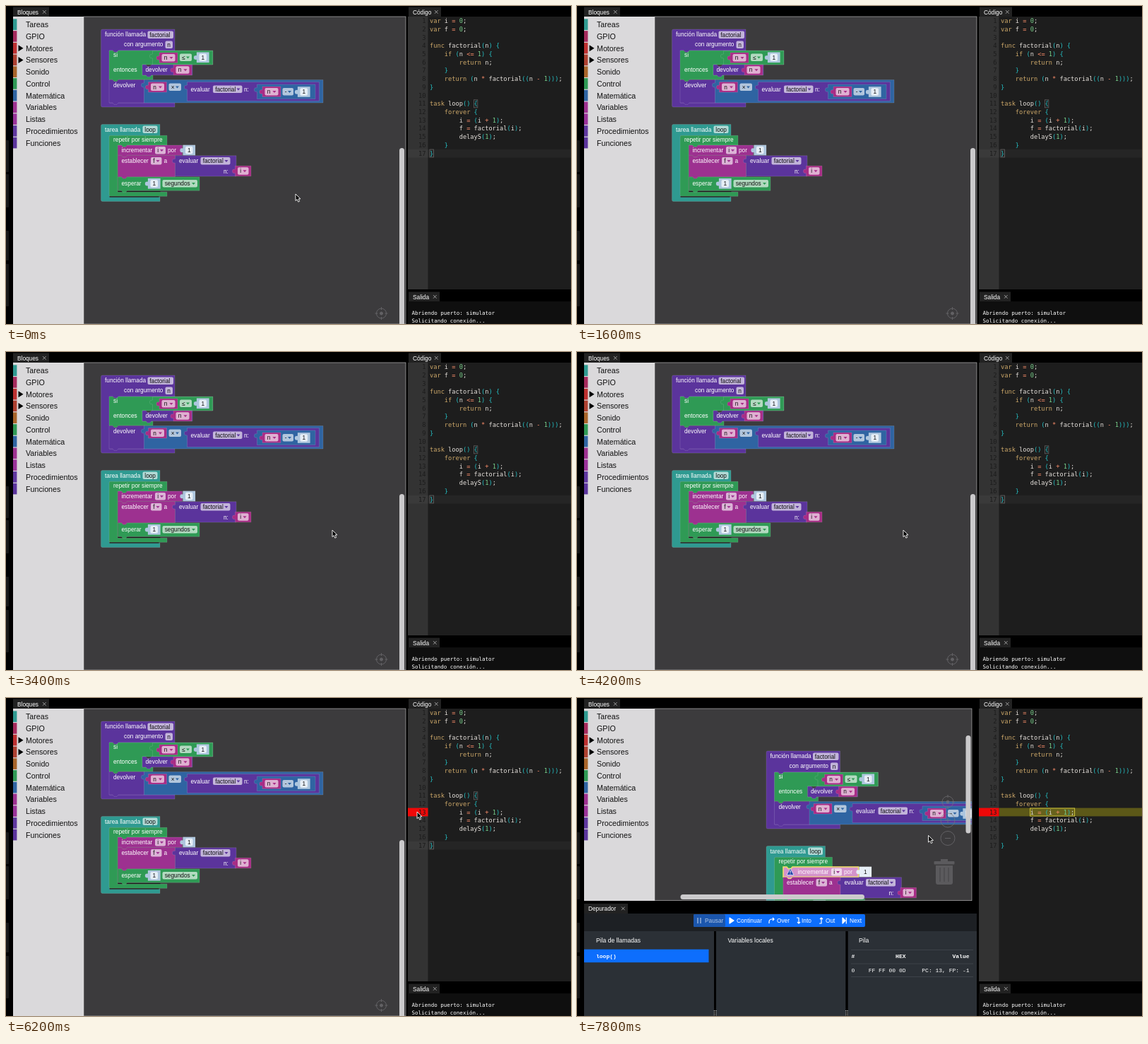
Recreate the animation shown at these times as an HTML page. Size 800 px wide and 450 px high, loop 8000 ms.

```html
<!DOCTYPE html>
<html lang="es">
<head>
<meta charset="utf-8">
<title>Depurador de bloques</title>
<style>
html, body { margin: 0; width: 100%; height: 100%; overflow: hidden; background: #000; }
svg { display: block; width: 100vw; height: 100vh; }
text { font-family: "Liberation Sans", Arial, sans-serif; font-size: 8.3px; fill: #fff; white-space: pre; }
.cat { font-size: 10.7px; fill: #111; }
.code { font-family: "DejaVu Sans Mono", monospace; font-size: 8.67px; fill: #e6e1dc; }
.out { font-family: "DejaVu Sans Mono", monospace; font-size: 7.52px; }
.mono { font-family: "Liberation Mono", monospace; font-size: 8px; }
.b { font-weight: bold; }
.dark { fill: #111; }
.end { text-anchor: end; }
.mid { text-anchor: middle; }
</style>
</head>
<body>
<svg id="stage" viewBox="0 0 800 450" preserveAspectRatio="none"></svg>
<script>
const LOOP = 8000, STEP = 200, BREAK_AT = 5800, HIT_AT = 6400;
const C = {
  teal: '#2f9a91', green: '#2f9a55', purple: '#5b349c', blue: '#2f64a2',
  magenta: '#9d3190', pink: '#a82c86', num: '#adc6de'
};

const esc = s => s.replace(/&/g, '&amp;').replace(/</g, '&lt;');
const text = (x, y, s, cls = '') => `<text x="${x}" y="${y}" class="${cls}">${esc(s)}</text>`;
const rect = (x, y, w, h, fill, more = '') =>
  `<rect x="${x}" y="${y}" width="${w}" height="${h}" fill="${fill}" ${more}/>`;
const path = (d, fill, more = '') => `<path d="${d}" fill="${fill}" ${more}/>`;
const group = (id, body, more = '') => `<g id="${id}" ${more}>${body}</g>`;
const EDGE = 'stroke="#fff" stroke-opacity=".2" stroke-width=".6"';

// Block shapes
const stmt = (x, y, w, h, c, edge = EDGE) =>
  path(`M${x} ${y}h5l2 2.4h4l2 -2.4H${x + w}v${h}H${x + 13}l-2 2.4h-4l-2 -2.4H${x}z`, c, edge);
const value = (x, y, w, h, c) =>
  path(`M${x} ${y}h${w}v${h}h${-w}V${y + 11}c0 -2 -4 1 -4 -3.5s4 -1.5 4 -3.5z`, c, EDGE);
const wrap = (x, y, w, head, h, c) =>
  path(`M${x} ${y + 2}q0 -2 2 -2H${x + w}v${head}H${x + 25}l-2 2.4h-4l-2 -2.4H${x + 12}V${y + h - 6}` +
    `H${x + w}v6H${x + 2}q-2 0 -2 -2z`, c, EDGE);
const field = (x, y, w, s, arrow) =>
  rect(x, y, w, 10.5, '#fff', 'rx="2" fill-opacity=".63"') +
  text(x + (arrow ? 3.2 : 2.8), y + 8, s, 'dark') +
  (arrow ? path(`M${x + w - 8} ${y + 4}h5l-2.5 3z`, arrow) : '');
const variable = (x, y, s, w = 26) =>
  value(x, y, w, 14.5, C.pink) + field(x + 3.5, y + 2, w - 7, s, C.pink);
const number = (x, y, c = C.num) =>
  value(x, y, 17.5, 14.5, c) + rect(x + 3.5, y + 2, 10.5, 10.5, '#e6eef6', 'rx="2"') +
  text(x + 8.8, y + 10.2, '1', 'dark mid');

const factorial = () =>
  wrap(134.5, 33, 104.5, 30, 110, C.purple) +
  text(140, 43.3, 'función llamada') + field(200.5, 35.5, 36.5, 'factorial') +
  text(167, 57.3, 'con argumento') + field(225.5, 49.5, 10.5, 'n') +
  path('M146 63h5l2 2.4h4l2 -2.4H293V83H193V98H208V104H159l-2 2.4h-4l-2 -2.4H146z', C.green, EDGE) +
  text(152, 72, 'si') + value(207.5, 63.5, 85, 19.5, C.green) +
  variable(217, 66, 'n') + field(246, 67.5, 17, '≤', C.green) + number(270, 65.5) +
  text(152, 93, 'entonces') + stmt(193, 83, 71, 14.8, C.purple) +
  text(197.5, 93, 'devolver') + variable(237, 83.2, 'n') +
  stmt(146, 104.5, 50, 32.5, C.purple) + text(152, 114.5, 'devolver') +
  value(195.5, 104.5, 253.5, 32.5, C.blue) + variable(201.5, 107.5, 'n') +
  field(230.5, 109.5, 17.5, '×', C.blue) + value(256.5, 107.5, 187, 27, C.purple) +
  text(261.5, 120.7, 'evaluar') + field(293, 112.5, 41.5, 'factorial', C.purple) +
  text(337, 120.7, 'n:') + value(355.5, 111, 82.5, 20.5, C.blue) +
  variable(363, 114, 'n') + field(391.5, 116, 15.5, '-', C.blue) + number(413, 114.2);

const increment = (dx, c, edge, numColor) =>
  stmt(158.5, 197, 91 + dx, 14.3, c, edge) + text(163.5 + dx, 207, 'incrementar') +
  field(211 + dx, 199, 15, 'i', C.magenta) + text(229 + dx, 207, 'por') +
  number(250.5 + dx, 196.8, numColor);

const warning = path('M168.5 199l5 9.5h-10z', '#2447a8', 'stroke="#dfe3ff" stroke-width=".8" stroke-linejoin="round"') +
  path('M168.5 202v3.4M168.5 206.4v1', 'none', 'stroke="#fff"');

const task = () =>
  wrap(134.5, 167.5, 83.5, 16, 109, C.teal) +
  text(140, 177.5, 'tarea llamada') + field(193.5, 169.5, 21, 'loop') +
  wrap(146, 183.3, 82, 13.7, 86, C.green) + text(152, 192.3, 'repetir por siempre') +
  path('M158.5 262.6h60M146.5 270h70', 'none', 'stroke="#151515" stroke-width="1"') +
  group('incPlain', increment(0, C.magenta)) +
  group('incHit', increment(15.5, '#d493cb', 'stroke="#f3e26a" stroke-width="1.5"', '#e6eef6') + warning) +
  stmt(158.5, 211.5, 81, 30, C.magenta) + text(163.5, 222, 'establecer') +
  field(205, 214, 15.5, 'f', C.magenta) + text(223.5, 222, 'a') +
  value(239.5, 211.8, 86.5, 29.2, C.purple) + text(245, 222, 'evaluar') +
  field(275.5, 214, 42, 'factorial', C.purple) + text(308, 236.5, 'n:') + variable(324.5, 226.3, 'i', 22.5) +
  stmt(158.5, 242, 115.5, 19.3, C.green) + text(163.5, 254, 'esperar') +
  number(201, 244) + field(221.5, 246, 49.5, 'segundos', C.green);

// Panels
const tab = (x, y, w, s) =>
  rect(x, y, w, 14, '#222') + text(x + 6, y + 10.2, s) +
  path(`M${x + w - 9} ${y + 4.6}l4.6 4.6m0 -4.6l-4.6 4.6`, 'none', 'stroke="#bbb" stroke-width=".8"');

const CATS = [['Tareas', C.teal], ['GPIO', '#a52a5c'], ['Motores', '#bd3030'], ['Sensores', '#ad4030'],
  ['Sonido', '#a8642a'], ['Control', C.green], ['Matemática', C.blue], ['Variables', C.magenta],
  ['Listas', '#9a3299'], ['Procedimientos', '#5f379f'], ['Funciones', C.purple]];
const toolbox = () => rect(10, 15, 100, 435, '#dad9db') + CATS.map(([name, c], i) => {
  const y = 26.2 + i * 16.74;
  const more = i === 2 || i === 3 ? path(`M17.5 ${y - 4.5}l7 4.5l-7 4.5z`, '#000') : '';
  return rect(10, y - 7.8, 5.4, 15.6, c) + more + text(28, y + 4, name, 'cat');
}).join('');

const LINES = `var i = 0;
var f = 0;

func factorial(n) {
    if (n <= 1) {
        return n;
    }
    return (n * factorial((n - 1)));
}

task loop() {
    forever {
        i = (i + 1);
        f = factorial(i);
        delayS(1);
    }
}`.split('\n');
const ROW = 11.72;
const tint = s =>
  /^(var|func|if|return|task|forever)$/.test(s) ? '#cda869' :
  /^\d/.test(s) ? '#78cf8a' : /^[(){}]/.test(s) ? '#24c2c7' : /^[-=<>+*]/.test(s) ? '#fa8d6a' : '';
const codeLine = (s, i) => {
  const y = 24.1 + i * ROW;
  const spans = (s.match(/\w+|\s+|[(){}]|[-=<>+*]+|;/g) || []).map(k => {
    const c = tint(k);
    return c ? `<tspan fill="${c}">${esc(k)}</tspan>` : esc(k);
  }).join('');
  return `<text class="code" x="600" y="${y}">${spans}</text>` +
    `<text class="code end" x="594.5" y="${y}" style="fill:#1c1c1c">${i + 1}</text>`;
};
const bracket = (x, y) => rect(x, y, 5.4, 11, 'none', 'stroke="#fff" stroke-opacity=".3" stroke-width=".8"');

const editor = () =>
  tab(570, 1.5, 46, 'Código') + rect(569, 15, 231, 386, '#1d1d1d') + rect(569, 15, 28.5, 386, '#333') +
  group('active', rect(569, 202.8, 231, 11.7, '#fff', 'fill-opacity=".035"') +
    bracket(662.4, 132.8) + bracket(600, 203)) +
  group('stopLine', rect(597.5, 155.6, 202.5, 11.8, '#5c5818') +
    rect(641.6, 156, 63, 11, '#67621c', 'stroke="#c9c03a" stroke-width="1"')) +
  group('breakpoint', rect(569, 155.6, 28.5, 11.8, '#f00808')) +
  LINES.map(codeLine).join('') +
  tab(570, 404.5, 44, 'Salida') + rect(569, 418, 231, 32, '#0f0f0f') +
  text(574.5, 437, 'Abriendo puerto: simulator', 'out') + text(574.5, 448.2, 'Solicitando conexión...', 'out');

const target = (x, y, r) =>
  `<circle cx="${x}" cy="${y}" r="${r}"/><circle cx="${x}" cy="${y}" r="2" fill="#77767a"/>` +
  `<path d="M${x - r - 2} ${y}h4M${x + r - 2} ${y}h4M${x} ${y - r - 2}v4M${x} ${y + r - 2}v4"/>`;
const GREY = 'fill="none" stroke="#77767a" stroke-width="1" opacity=".65"';
const wideTools = rect(557, 201, 7, 260, '#cbcacc', 'rx="3.5"') + group('center', target(531.5, 435, 7), GREY);
const smallTools =
  group('zoom', target(525, 147, 8) +
    '<circle cx="525" cy="173" r="10"/><path d="M521 173h8M525 169v8"/>' +
    '<circle cx="525" cy="198.5" r="10"/><path d="M521 198.5h8"/>', GREY) +
  rect(505.5, 231, 29, 4.5, '#5b5a5d', 'rx="1"') + rect(515, 228, 10, 3, '#5b5a5d') +
  path('M508 237h24v24q0 3 -3 3h-18q-3 0 -3 -3z', '#5b5a5d') +
  path('M514 240v20M520 240v20M526 240v20', 'none', 'stroke="#4c4b4e" stroke-width="1.5"') +
  rect(550.5, 53, 7, 138.5, '#cbcacc', 'rx="3.5"') + rect(146.5, 278, 260.5, 7, '#cbcacc', 'rx="3.5"');

const LINE = 'stroke="#fff" stroke-width="1.2"';
const button = (x, s, icon) => path(icon, icon.endsWith('z') ? '#fff' : 'none', LINE + ' stroke-linejoin="round"') +
  text(x, 318, s);
const debuggerPanel = () =>
  rect(10, 287, 556, 163, '#000') + tab(10, 291, 62, 'Depurador') + rect(10, 305, 556, 145, '#1d2024') +
  rect(165, 306, 243, 18, '#0d6efd', 'rx="2"') + rect(165, 306, 45, 18, '#1b56ad', 'rx="2"') +
  group('pause', button(181, 'Pausar', 'M171 311v8M175 311v8'), 'opacity=".65"') +
  button(226, 'Continuar', 'M216 311l6 4l-6 4z') +
  button(283, 'Over', 'M272 319v-2q0 -4 4 -4h3m-2 -2l2 2l-2 2') +
  button(318, 'Into', 'M311 311h3v8m-2 -2l2 2l2 -2') +
  button(352, 'Out', 'M343 319h3v-8m-2 2l2 -2l2 2') +
  button(386, 'Next', 'M376 311l4 4l-4 4zM381.3 311v8z') +
  [[10, 184, 'Pila de llamadas', 27], [197, 183, 'Variables locales', 213.5], [384, 182, 'Pila', 399]]
    .map(([x, w, s, tx]) => rect(x, 330, w, 120, '#2b3036') +
      `<text x="${tx}" y="346" style="font-size:8.6px">${s}</text>`).join('') +
  path('M195.5 330V450M382 330V450', 'none', 'stroke="#000" stroke-width="3"') +
  path('M194.5 442v8M196.8 442v8M380.8 442v8M383 442v8', 'none', 'stroke="#ddd" stroke-width="1.2" stroke-dasharray="1.2 1.2"') +
  rect(10, 355.7, 176.5, 18.5, '#0d6efd') + text(27, 368, 'loop()', 'mono b') +
  path('M388 356.5H561M388 376H561M388 394.5H561', 'none', 'stroke="#454b52" stroke-width=".7"') +
  text(388.5, 368.3, '#', 'mono b') + text(465.5, 368.3, 'HEX', 'mono b end') + text(555.5, 368.3, 'Value', 'mono b end') +
  text(388.5, 388, '0', 'mono') + text(465.5, 388, 'FF FF 00 0D', 'mono end') + text(555.5, 388, 'PC: 13, FP: -1', 'mono end');

const sideStrip = [[190, 45], [238, 47], [318, 42], [365, 60]]
  .map(([y, h]) => rect(-2, y, 6, h, '#171717', 'rx="1"')).join('');

const stage = document.getElementById('stage');
stage.innerHTML =
  `<clipPath id="clip"><rect class="space" x="110" y="15"/></clipPath>` +
  rect(0, 0, 800, 450, '#000') + sideStrip + tab(10, 1.5, 51, 'Bloques') +
  '<rect class="space" x="110" y="15" fill="#3c3b3d"/>' +
  `<g clip-path="url(#clip)">${group('blocks', factorial() + task())}</g>` +
  group('wide', wideTools) + group('small', smallTools + debuggerPanel()) +
  '<rect class="space" x="110" y="15" fill="none" stroke="#c6c6c6" stroke-width=".6"/>' +
  toolbox() + group('lower', rect(10, 286.7, 100, 163.3, '#000')) + editor() +
  group('cursor', path('M0 0V9.6L2.2 7.6L3.8 11.2L5.6 10.4L4 6.9H7z', '#000', 'stroke="#fff" stroke-width=".9"'));
// The debugger covers the foot of the toolbox
$('lower').replaceWith($('small'));

function $(id) { return document.getElementById(id); }
const spaces = document.querySelectorAll('.space');
const show = (id, on) => $(id).setAttribute('display', on ? 'inline' : 'none');

// Pointer path: time, x, y
const PATH = [[0, 410, 266], [200, 412, 264], [800, 520, 196], [1000, 533, 188], [1200, 545, 180],
  [1600, 640, 135], [2500, 640, 150], [2800, 570, 190], [3200, 475, 245], [3400, 462, 252],
  [4600, 462, 252], [4800, 489, 221], [5000, 526, 194], [5400, 579, 164], [5600, 582, 161],
  [6900, 582, 161], [7600, 504, 192], [7800, 497.5, 194.5], [8000, 497.5, 194.5]];
function pointer(t) {
  const i = Math.max(1, PATH.findIndex(p => p[0] >= t));
  const [t0, x0, y0] = PATH[i - 1], [t1, x1, y1] = PATH[i];
  const k = (t - t0) / (t1 - t0);
  return [x0 + (x1 - x0) * k, y0 + (y1 - y0) * k];
}

function draw(ms) {
  const t = Math.floor((ms % LOOP) / STEP) * STEP;
  const hit = t >= HIT_AT;
  const [x, y] = pointer(t);
  $('cursor').setAttribute('transform', `translate(${x} ${y})`);
  show('cursor', x < 597);
  show('breakpoint', t >= BREAK_AT);
  for (const id of ['stopLine', 'small', 'incHit']) show(id, hit);
  for (const id of ['active', 'wide', 'incPlain']) show(id, !hit);
  $('blocks').setAttribute('transform', hit ? 'translate(133.5 42)' : '');
  for (const s of spaces) {
    s.setAttribute('width', hit ? 449 : 456);
    s.setAttribute('height', hit ? 271.7 : 435);
  }
}

const start = performance.now();
function tick() {
  draw(performance.now() - start);
  requestAnimationFrame(tick);
}
tick();
</script>
</body>
</html>
```
